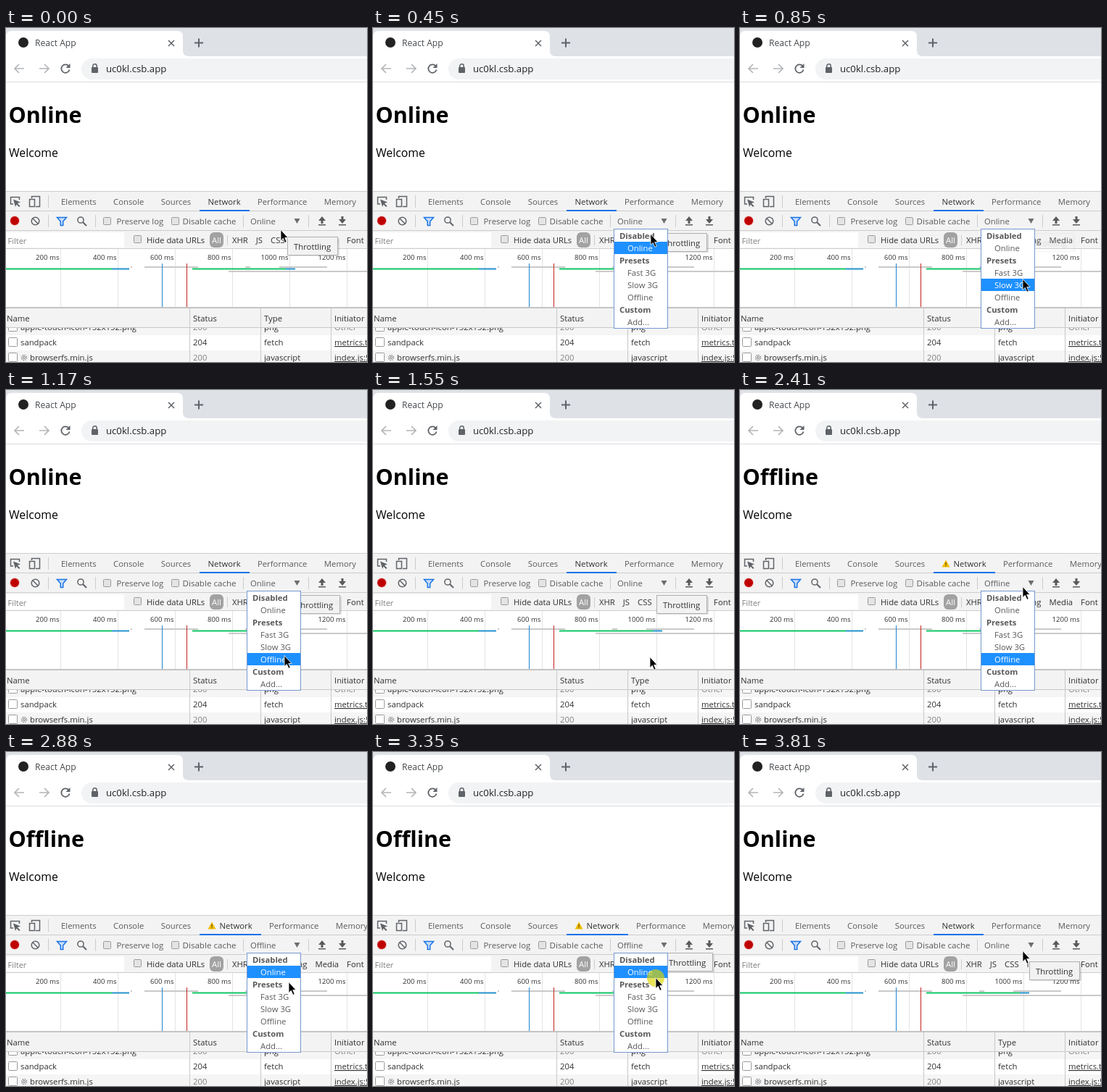
Write an HTML page that moves like this. It is 498 px wide and 461 px high and loops after 3900 ms.

```html
<!DOCTYPE html>
<html lang="en">
<head>
<meta charset="utf-8">
<title>Network throttling</title>
<style>
html, body { margin: 0; width: 100%; height: 100%; overflow: hidden; background: #fff; }
svg { display: block; width: 498px; height: 461px; }
text { font-family: "Open Sans", "Noto Sans", sans-serif; font-size: 11.3px; fill: #303030; white-space: pre; }
.soft { fill: #5a5a5a; }
.pale { fill: #808080; }
.bold { font-weight: 700; fill: #5a5a5a; }
.link { text-decoration: underline; }
.tick { font-size: 9.6px; text-anchor: end; }
.line { fill: none; stroke: #5f6368; stroke-width: 1.5; }
</style>
</head>
<body>
<svg id="stage" viewBox="0 0 498 461" xmlns="http://www.w3.org/2000/svg"></svg>
<script>
const LOOP = 3900;
const stage = document.getElementById('stage');

function add(parent, tag, attrs, content) {
  const el = document.createElementNS('http://www.w3.org/2000/svg', tag);
  for (const key in attrs) el.setAttribute(key, attrs[key]);
  if (content !== undefined) el.textContent = content;
  parent.appendChild(el);
  return el;
}
const group = () => add(stage, 'g', {});
const rect = (x, y, width, height, fill, more, parent = stage) =>
  add(parent, 'rect', { x, y, width, height, fill, ...more });
const text = (x, y, content, cls = '', more, parent = stage) =>
  add(parent, 'text', { x, y, class: cls, ...more }, content);
const line = (d, more) => add(stage, 'path', { d, class: 'line', ...more });
const shape = (d, fill, parent = stage) => add(parent, 'path', { d, fill });
const circle = (cx, cy, r, fill, more) => add(stage, 'circle', { cx, cy, r, fill, ...more });
const checkbox = (x, y, fill = '#e4e4e4', size = 10) =>
  rect(x + .5, y + .5, size, size, fill, { stroke: '#9a9a9a', rx: 1 });

// Labels that follow each other with an even gap
function flow(x, y, gap, labels, cls) {
  const row = text(x, y, undefined, cls);
  return labels.map((label, i) => add(row, 'tspan', { dx: i ? gap : 0 }, label));
}

function drawBrowser() {
  rect(0, 0, 498, 39, '#dee1e6');
  shape('M0 39V12Q0 4 8 4H236Q244 4 244 12V31Q244 39 252 39Z', '#fff');
  circle(24, 20, 7, '#222');
  text(40, 25, 'React App', '', { style: 'font-size:12.1px;fill:#45494d' });
  line('M224 17L232 25M232 17L224 25');
  line('M260 20.5H272M266 14.5V26.5', { style: 'stroke-width:2' });

  const faded = { style: 'stroke:#b3b5b8;stroke-width:1.7' };
  line('M25 56H12M18 50L12 56L18 62', faded);
  line('M46 56H59M53 50L59 56L53 62', faded);
  line('M86.5 52.5A5.7 5.7 0 1 0 87.6 57.5', { style: 'stroke-width:1.8' });
  shape('M88.5 49V55H82.5Z', '#5f6368');
  rect(104, 42, 420, 29, '#f1f3f4', { rx: 14.5 });
  rect(118, 54, 9, 8, '#5f6368', { rx: 1 });
  line('M119.8 55V52.5A2.7 2.7 0 0 1 125.2 52.5V55');
  text(138, 60.5, 'uc0kl.csb.app', '', { style: 'font-size:13.2px;fill:#202124' });
  rect(0, 74, 498, 1, '#dadce0');
  text(4, 178, 'Welcome', '', { style: 'font-size:15.8px;fill:#000' });
}

function drawToolbars() {
  rect(0, 225, 498, 80, '#f3f3f3');
  for (const y of [225, 252, 279, 304]) rect(0, y, 498, 1, '#cdcdcd');
  rect(58, 231, 1, 17, '#ccc');
  for (const x of [58, 123, 327, 417]) rect(x, 258, 1, 17, '#ccc');

  line('M10 243H6.5V233.5H18.5V237');
  shape('M10 236.5L20 240.5L15.8 242L19.5 245.7L18 247L14.4 243.5L13 247Z', '#5f6368');
  line('M35.5 235V232.5H46.5V246.5H41M32.5 236.5H39.5V246.5H32.5Z');

  circle(12, 266, 7, '#f0c8c8');
  circle(12, 266, 6, '#c00000');
  circle(40.5, 266.5, 5.3, 'none', { class: 'line' });
  line('M36.8 262.8L44.2 270.2');
  line('M70.5 261.5H83.5L78.7 267V272.5H75.3V267Z', { style: 'fill:#c9def8;stroke:#1a73e8' });
  circle(103, 265, 4.1, 'none', { class: 'line' });
  line('M106 268L111 273', { style: 'stroke-width:2' });
  checkbox(134, 261);
  text(152.5, 271, 'Preserve log', 'soft');
  checkbox(228, 261);
  text(243.5, 271, 'Disable cache', 'soft', { style: 'font-size:11.6px' });
  shape('M397.5 263H405.5L401.5 270Z', '#6e6e6e');
  shape('M436 260L441 266H437.5V270H434.5V266H431Z M431 271H441V272.5H431Z', '#5a5a5a');
  shape('M464 270L459 264H462.5V260H465.5V264H469Z M459 271H469V272.5H459Z', '#5a5a5a');

  rect(0, 282, 163, 21, '#fff');
  text(2.5, 298, 'Filter', 'pale', { style: 'font-size:11px' });
  checkbox(176, 286);
  text(194, 297, 'Hide data URLs');
  rect(281, 282, 19, 21, '#a2a2a2', { rx: 6 });
  text(284, 297, 'All', '', { style: 'fill:#fff' });
  rect(305, 286, 1, 14, '#ccc');
  flow(312, 297, 11, ['XHR', 'JS', 'CSS', 'Img', 'Media', 'Font']);
}

function drawOverview() {
  for (let i = 1; i < 7; i++) {
    const x = 79 * i - 4;
    rect(x, 305, 1, 80, '#e4e4e4');
    text(x - 1.5, 320, `${i * 200} ms`, 'tick');
  }
  const bar = (x, y, end, fill = '#cacaca') => rect(x, y, end - x, 2, fill);
  const download = (x, split, end) => {
    bar(x, 331.5, split, '#0fc564');
    bar(split, 331.5, end, '#2492cf');
  };
  bar(172, 329, 174);
  bar(191, 329, 265);
  bar(330, 329, 337);
  bar(377, 329, 443);
  bar(307, 335, 498);
  download(0, 146, 170);
  download(257, 386, 399);
  rect(215, 325, 1, 60, '#1b83d2');
  rect(249, 325, 1, 60, '#c5221f');
}

function drawTable() {
  const columns = [1, 258, 356, 453];
  const rows = [
    ['apple-touch-icon-152x152.png', '200', 'png', 'Other'],
    ['sandpack', '204', 'fetch', 'metrics.ts:14'],
    ['browserfs.min.js', '200', 'javascript', 'index.js:52']
  ];
  rows.forEach(([name, status, type, from], i) => {
    const y = 417 + 21 * i;
    rect(0, y - 14, 498, 21, i % 2 ? '#fff' : '#f5f5f5');
    checkbox(3, y - 11, '#fff', 12);
    text(i === 2 ? 33 : 20, y, name);
    text(columns[1], y, status, status === '200' ? 'pale' : '');
    text(columns[2], y, type);
    text(columns[3], y, from, i ? 'link' : 'pale');
  });
  circle(25, 455, 1.6, 'none', { class: 'line', style: 'stroke-width:.8' });
  circle(25, 455, 3.5, 'none', { class: 'line', 'stroke-dasharray': '1.4 1.35', style: 'stroke-width:1.1' });

  rect(0, 385, 498, 29, '#f3f3f3');
  rect(0, 385, 498, 2, '#c4c4c4');
  rect(0, 413, 498, 1, '#c8c8c8');
  ['Name', 'Status', 'Type', 'Initiator'].forEach((label, i) => {
    text(columns[i], 405, label);
    if (i) rect(columns[i] - 5, 387, 1, 74, '#c8c8c8');
  });
}

drawBrowser();
drawToolbars();
drawOverview();
drawTable();

const heading = text(3.5, 131, '', '', { style: 'font-size:30.5px;font-weight:700;fill:#000' });
const choice = text(337, 271, '', 'soft');

const TAB_GAP = 23.4, WARNING_WIDTH = 16;
const networkTab = flow(76, 244, TAB_GAP,
  ['Elements', 'Console', 'Sources', 'Network', 'Performance', 'Memory'], 'soft')[3];
networkTab.style.fill = '#303030';
const underline = rect(267, 251, 69, 2, '#1a73e8');
const warning = group();
shape('M284 234.5L289.5 244.5H278.5Z', '#f2bd00', warning);
shape('M283.4 237.8H284.6V241.2H283.4Z M283.4 242H284.6V243.2H283.4Z', '#5c4a00', warning);

const tip = group();
rect(2, 2, 70, 25, '#000', { opacity: .12, rx: 1 }, tip);
rect(.5, .5, 69, 25, '#f2f2f2', { stroke: '#b0b0b0' }, tip);
text(9, 17.5, 'Throttling', '', {}, tip);

const ROW = 17, MENU_TOP = 278;
const TITLES = ['Disabled', 'Presets', 'Custom'];
const OPTIONS = ['Disabled', 'Online', 'Presets', 'Fast 3G', 'Slow 3G', 'Offline', 'Custom', 'Add...'];
const isTitle = row => TITLES.includes(OPTIONS[row]);
const menu = group();
rect(332.5, MENU_TOP - .5, 74, 137, '#fff', { stroke: '#7598cf' }, menu);
const highlight = rect(333, 0, 73, ROW, '#1e90ff', {}, menu);
const items = OPTIONS.map((label, i) => {
  const [x, cls] = isTitle(i) ? [340, 'bold'] : [351, 'soft'];
  return text(x, 291 + ROW * i, label, cls, {}, menu);
});

const glow = circle(0, 0, 12, '#dcd400', { opacity: .65 });
const pointer = group();
add(pointer, 'path', {
  d: 'M0 -.5V14.5L3.3 11.3L5.9 17.3L8.2 16.3L5.7 10.5H10Z',
  fill: '#000', stroke: '#fff', 'stroke-width': .8
});

const FRAME = 78;
const MOVES = [
  { from: 0, to: 0, x: 379, y: 279 },
  { from: 80, to: 80, x: 382, y: 273 },
  { from: 450, to: 930, x: 391, y: 359 },
  { from: 1000, to: 1240, x: 382, y: 369 },
  { from: 1860, to: 2010, x: 390, y: 272 },
  { from: 2650, to: 2880, x: 390, y: 318 },
  { from: 3110, to: 3110, x: 390, y: 312 },
  { from: 3500, to: 3730, x: 390, y: 275 }
];
const [OPEN_1, PICK_1, OPEN_2, PICK_2] = [80, 1470, 2180, 3350];
const CLICKS = [OPEN_1, PICK_1, OPEN_2, PICK_2];
const TIPS = [
  { from: 0, x: 388, y: 288 },
  { from: OPEN_1, x: 391, y: 283 },
  { from: 2010, x: 399, y: 289 },
  { from: OPEN_2, x: 399, y: 277 },
  { from: 3650, x: 399, y: 289 }
];

const clamp = v => Math.max(0, Math.min(1, v));
const between = (t, from, to) => t >= from && t < to;
const show = (el, on) => el.setAttribute('visibility', on ? 'visible' : 'hidden');
const place = (el, x, y) => el.setAttribute('transform', `translate(${x} ${y})`);

function pointerAt(t) {
  let x = 0, y = 0;
  for (const move of MOVES) {
    if (t < move.from) break;
    const steps = Math.round((move.to - move.from) / FRAME) + 1;
    const done = clamp(Math.floor((t - move.from) / FRAME + 1.1) / steps);
    x += (move.x - x) * done;
    y += (move.y - y) * done;
  }
  return [Math.round(x), Math.round(y)];
}

// Titles cannot be picked: the option before stays lit
function rowAt(y, selected) {
  const row = Math.floor((y - MENU_TOP) / ROW);
  if (row < 1) return OPTIONS.indexOf(selected);
  return isTitle(row) ? row - 1 : row;
}

function tipOpacity(t) {
  const outside = (from, to) => clamp(Math.max(from - t, t - to) / 200);
  return outside(875, 980) * outside(2400, 3150);
}

function render(t) {
  const mode = between(t, PICK_1 + 160, PICK_2 + 150) ? 'Offline' : 'Online';
  const warned = between(t, 1860, 3580);
  const shift = warned ? WARNING_WIDTH : 0;
  heading.textContent = choice.textContent = mode;
  show(warning, warned);
  networkTab.setAttribute('dx', TAB_GAP + shift);
  underline.setAttribute('width', 69 + shift);

  const spot = TIPS.findLast(s => s.from <= t);
  place(tip, spot.x, spot.y);
  tip.setAttribute('opacity', tipOpacity(t));

  const [x, y] = pointerAt(t);
  place(pointer, x, y);
  place(glow, x, y);
  show(glow, CLICKS.some(c => between(t, c, c + 70)));

  const row = rowAt(y, mode);
  show(menu, between(t, OPEN_1 + 140, PICK_1 + 70) || between(t, OPEN_2 + 150, PICK_2 + 70));
  highlight.setAttribute('y', MENU_TOP + ROW * row);
  items.forEach((el, i) => { el.style.fill = i === row ? '#fff' : ''; });
}

function tick() {
  render(performance.now() % LOOP);
  requestAnimationFrame(tick);
}
tick();
</script>
</body>
</html>
```
